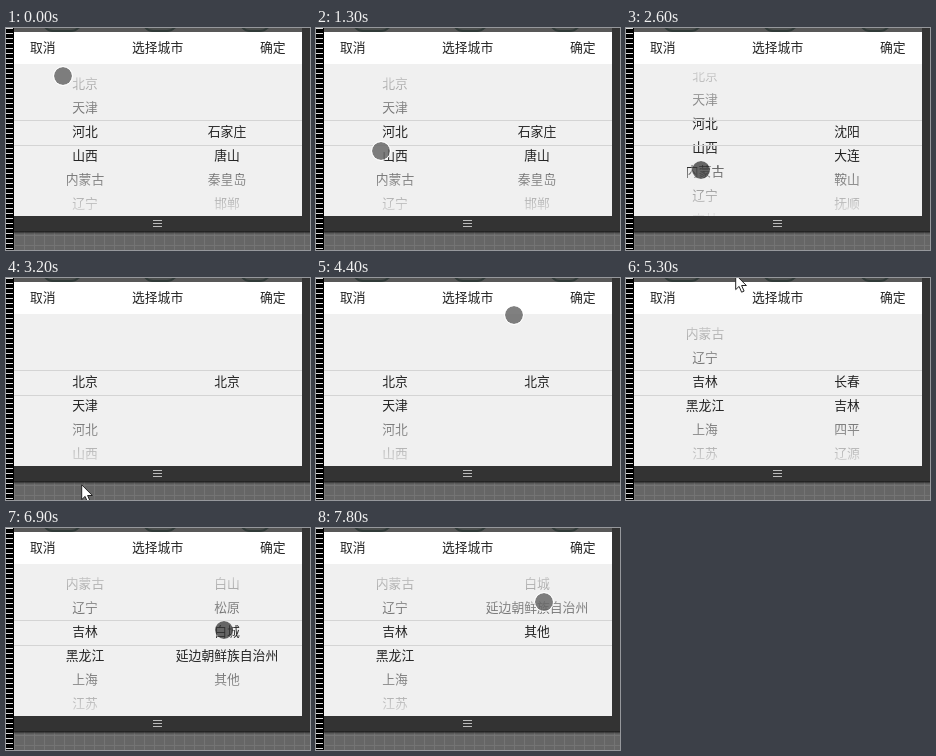
An HTML page for the animation above (8 s loop, 304 px wide and 222 px high).

```html
<!DOCTYPE html>
<html lang="zh-CN">
<head>
<meta charset="utf-8">
<title>选择城市</title>
<style>
html, body { margin: 0; width: 100%; height: 100%; overflow: hidden; }
body { position: relative; background: #333; font: 12.8px/24px "Noto Sans CJK SC", "Noto Sans CJK", sans-serif; color: #222; }
div, svg { position: absolute; }
.ruler { left: 0; top: 0; width: 8px; height: 222px; background:
  repeating-linear-gradient(#ddd 0 1px, transparent 1px 5px) 0 0 / 7px 100% no-repeat, #000; }
.page { left: 8px; top: 0; width: 288px; height: 4px; background: #585858; overflow: hidden; }
.page div { top: -7px; height: 7px; background: #4a4d4c; border: 2px solid #303a38; border-radius: 0 0 14px 14px; }
.grid { left: 8px; top: 203px; width: 296px; height: 19px; background:
  linear-gradient(#161616, transparent 3px),
  repeating-linear-gradient(90deg, #747474 0 1px, transparent 1px 10px),
  repeating-linear-gradient(#747474 0 1px, transparent 1px 10px) 0 4px, #666; }
.grip { left: 147px; top: 192px; width: 9px; height: 7px; background: repeating-linear-gradient(#bbb 0 1px, transparent 1px 3px); }
.head { left: 8px; top: 4px; width: 288px; height: 32px; background: #fff; }
.head div { top: 3px; white-space: nowrap; }
.picker { left: 8px; top: 36px; width: 288px; height: 152px; background: #f0f0f0; overflow: hidden; }
.col { top: 0; width: 144px; text-align: center; white-space: nowrap; }
.col div { left: 0; width: 100%; height: 24px; }
.mask { left: 0; width: 100%; }
.line { left: 0; width: 100%; height: 1px; background: #d4d4d4; }
#dot { left: -10px; top: -10px; width: 20px; height: 20px; box-sizing: border-box; border-radius: 50%;
  background: rgba(100,100,100,.82); border: 1.5px solid #fff; background-clip: padding-box; }
#dot.press { background-color: rgba(55,55,55,.75); border-color: rgba(240,240,240,.5); }
</style>
</head>
<body>
<div class="page">
  <div style="left:28px;width:36px"></div>
  <div style="left:128px;width:32px"></div>
  <div style="left:225px;width:28px"></div>
</div>
<div class="head">
  <div style="left:16px">取消</div>
  <div style="left:118px">选择城市</div>
  <div style="left:246px">确定</div>
</div>
<div class="picker">
  <div class="col" id="province" style="left:-1px"></div>
  <div class="col" id="city" style="left:141px"></div>
  <div class="mask" style="top:0;height:56px;background:linear-gradient(#f0f0f0 8px,rgba(240,240,240,.85) 8px,rgba(240,240,240,.32))"></div>
  <div class="mask" style="top:104px;height:48px;background:linear-gradient(rgba(240,240,240,.32),rgba(240,240,240,.92))"></div>
  <div class="line" style="top:56px"></div>
  <div class="line" style="top:81px"></div>
</div>
<div class="grip"></div>
<div class="grid"></div>
<div class="ruler"></div>
<div id="dot"></div>
<svg id="arrow" style="left:0;top:0" width="14" height="21" viewBox="0 0 14 21">
  <path d="M.7 .8V15.6L4.1 12.4L6.6 18.2L9.1 17.1L6.6 11.5H11.4Z" fill="#fff" stroke="#222"/>
</svg>
<script>
const LOOP = 8000, TICK = 100, ROW = 24, SETTLE = 200;
const $ = id => document.getElementById(id);
const words = s => s.split(' ');

const provinces = words('北京 天津 河北 山西 内蒙古 辽宁 吉林 黑龙江 上海 江苏 浙江');
const cities = {
  河北: words('石家庄 唐山 秦皇岛 邯郸 邢台'),
  辽宁: words('沈阳 大连 鞍山 抚顺 本溪'),
  北京: ['北京'],
  吉林: words('长春 吉林 四平 辽源 通化 白山 松原 白城 延边朝鲜族自治州 其他')
};

// Pointer moves; those with a column drag it and let it settle on a row.
const move = (start, end, x, y, col, row) => ({ start, end, x, y, col, row });
const moves = [
  move(100, 1000, 66, 101),
  move(1000, 1400, 65, 130),
  move(1500, 1800, 69, 58, 'province', 5),
  move(1900, 2100, 75, 78),
  move(2200, 3000, 75, 206, 'province', 0),
  move(3200, 3400, 110, 118),
  move(3500, 3700, 242, 17),
  move(3800, 4200, 262, 23),
  move(4300, 4500, 133, 50),
  move(4600, 4800, 102, 148),
  move(4800, 5200, 109, 4, 'province', 6),
  move(5200, 5300, 109, -4),
  move(5300, 5500, 112, -30),
  move(5600, 5700, 218, 165),
  move(5800, 6200, 218, 69, 'city', 4),
  move(6200, 6600, 218, 174),
  move(6600, 7275, 218, 12, 'city', 9),
  move(7400, 7800, 228, 74)
];

const clamp = v => Math.min(1, Math.max(0, v));
const mix = (a, b, k) => a + (b - a) * k;

function stateAt(t) {
  const s = { x: 57, y: 48, province: 2, city: 0, chosen: 2, press: false };
  for (const m of moves) {
    if (t < m.start - TICK) break;
    const k = clamp((t - m.start) / (m.end - m.start));
    const y = mix(s.y, m.y, k);
    if (m.col) {
      const pulled = s[m.col] + (s.y - y) / ROW;
      const rest = 1 - clamp((t - m.end) / SETTLE);
      s[m.col] = t < m.end ? pulled : mix(m.row, pulled, rest * rest);
      s.press = t <= m.end;
      if (m.col === 'province' && t >= m.end + TICK) s.chosen = m.row;
    }
    s.x = mix(s.x, m.x, k);
    s.y = y;
  }
  return s;
}

function fill(col, list) {
  col.replaceChildren(...list.map((text, i) => {
    const row = document.createElement('div');
    row.textContent = text;
    row.style.top = 55 + i * ROW + 'px';
    return row;
  }));
}

const place = (el, x, y) => el.style.transform = `translate(${Math.round(x)}px, ${Math.round(y)}px)`;

let shown;
function draw(time) {
  const s = stateAt(Math.floor(time % LOOP / TICK) * TICK);
  if (s.chosen !== shown) {
    shown = s.chosen;
    fill($('city'), cities[provinces[shown]]);
  }
  for (const col of ['province', 'city']) place($(col), 0, -ROW * s[col]);

  const outside = s.y < 0 || s.y > 188;
  $('arrow').style.display = outside ? '' : 'none';
  $('dot').style.display = outside ? 'none' : '';
  $('dot').className = s.press ? 'press' : '';
  place($(outside ? 'arrow' : 'dot'), s.x, s.y);
}

fill($('province'), provinces);
const start = performance.now();
function loop() {
  draw(performance.now() - start);
  requestAnimationFrame(loop);
}
loop();
</script>
</body>
</html>
```
